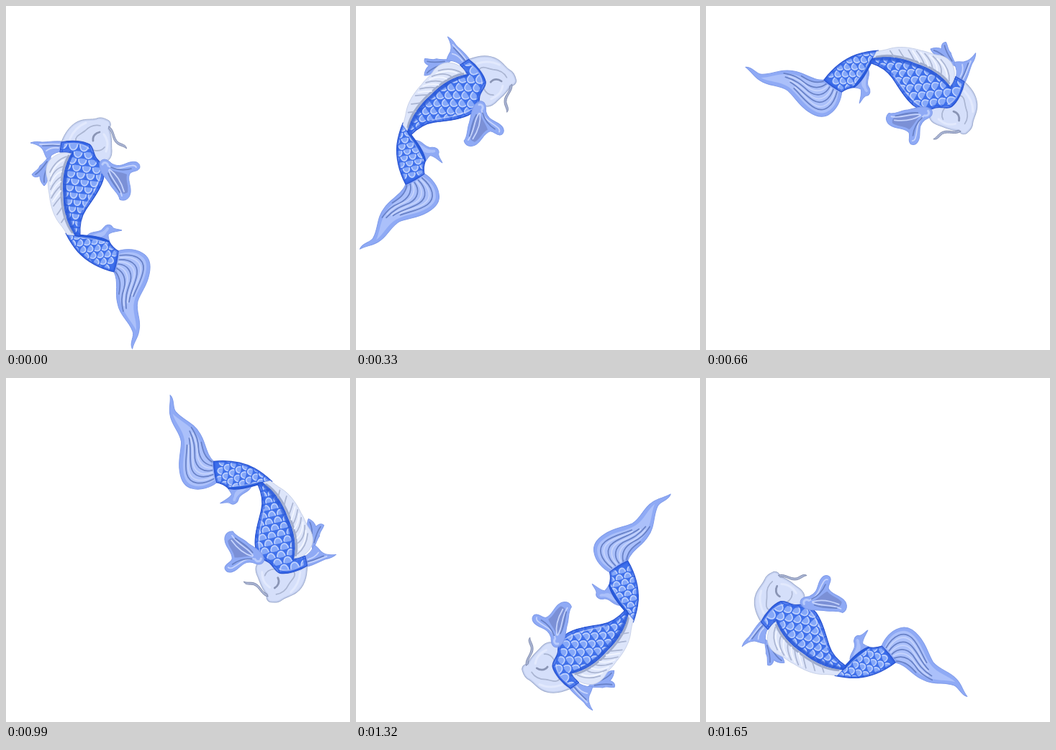
An HTML page for the animation above (1980 ms loop, 478 px wide and 480 px high).

```html
<!DOCTYPE html>
<html lang="en">
<head>
<meta charset="utf-8">
<title>Swimming koi</title>
<style>
  html, body { margin: 0; height: 100%; overflow: hidden; background: #fff; }
  svg { display: block; width: 100%; height: 100%; }
  #koi { fill: none; stroke-linecap: round; stroke-linejoin: round; }
  .fin { fill: #8faaf5; stroke: #7f9bea; }
  .pale { fill: #abc0fa; }
  .shade { fill: #7b90d6; }
  .ray { stroke: #6780c6; stroke-width: 1.7; }
  .light { stroke: #c6d4fc; stroke-width: 1.8; }
  .grey { stroke: #aab5d2; stroke-width: 1.7; }
  .blue { fill: #3f70ea; }
  .scale { fill: #86a8f8; stroke: #3f70ea; stroke-width: 1.6; }
  .glint { stroke: #bdd0fd; stroke-width: 1.7; }
  .rim { stroke: #2f62e6; stroke-width: 8; opacity: .7; }
  .edge { stroke: #2a54d0; stroke-width: 1.2; }
</style>
</head>
<body>
<svg viewBox="0 0 478 480">
  <defs>
    <path id="trunk" d="M77 190C90 187 107 188 116 193C122 197 121 207 126 213C134 221 138 231 135 242C131 257 120 270 111 284C103 296 102 308 103 321L94 320C84 302 79 283 79 262C78 238 82 220 90 206C85 203 79 204 75 204Z"/>
    <path id="stem" d="M83 317C100 321 126 318 143 328C146 334 151 339 156 342C155 352 153 362 150 371C130 366 112 356 100 343C93 335 88 327 83 317Z"/>
    <path id="skull" d="M77 190C82 176 91 164 103 160C112 157 119 159 126 157C133 154 139 158 143 160C147 164 145 169 143 171C148 182 146 193 147 202C147 211 144 216 135 219C126 219 123 211 121 203C118 190 101 187 77 190Z"/>
    <clipPath id="inTrunk"><use href="#trunk"/></clipPath>
    <clipPath id="inStem"><use href="#stem"/></clipPath>
    <clipPath id="inSkull"><use href="#skull"/></clipPath>
  </defs>
  <g id="koi">
    <!-- far fins -->
    <path class="fin" d="M62 208C56 213 53 219 47 223C45 229 40 230 36 235C38 240 44 239 47 237C47 244 50 248 53 251C58 247 58 239 61 231Z"/>
    <path class="ray" d="M57 217C51 226 47 231 41 235M58 223C54 232 52 238 53 246"/>
    <path class="fin" d="M78 189C66 188 58 190 50 190C44 189 39 189 34 191C43 193 49 196 52 202C54 207 55 211 58 214C64 206 70 204 77 203Z"/>
    <path class="light" d="M74 193C64 192 56 193 47 193M73 198C65 197 60 199 56 202"/>
    <path class="ray" d="M75 195C64 194 57 195 51 195"/>

    <!-- lower fin -->
    <path class="fin" d="M111 322C118 312 130 318 135 310C138 305 144 304 147 307C149 312 156 311 161 313C153 315 146 315 142 319C142 323 143 326 144 329Z"/>
    <path class="pale" d="M119 320C128 316 135 317 140 309C144 308 144 312 140 315C138 319 136 321 132 322Z"/>

    <!-- tail -->
    <path class="fin" d="M155 342C167 338 181 339 190 345C199 350 202 360 199 374C196 390 187 400 183 412C180 426 188 438 185 452C184 462 178 468 175.5 478.5C171 470 179 461 176 454C171 440 158 432 155 415C151 400 157 385 150 371Z"/>
    <path class="pale" d="M157 346C170 342 181 343 188 349C196 354 197 364 193 377C189 390 181 400 178 413C175 426 182 440 181 453C176 442 164 430 160 416C156 402 161 386 154 369Z"/>
    <path class="ray" d="M158 348C178 345 192 352 191 367C190 380 182 392 177 405M157 354C172 353 184 360 182 374C180 388 173 398 171 413M156 360C168 361 176 370 173 384C169 396 165 405 167 422M154 366C164 372 167 382 164 394C160 405 160 413 163 426M152 371C160 380 159 391 157 402"/>
    <path class="light" d="M159 351C175 349 189 355 187 370C185 383 178 392 175 404M157 357C170 357 180 364 178 377C175 390 169 400 169 414M155 363C166 366 171 376 168 388C164 398 163 406 164 418"/>

    <!-- rear body -->
    <use href="#stem" class="blue"/>
    <g clip-path="url(#inStem)">
      <g id="stemScales"></g>
      <use href="#stem" class="rim" style="stroke-width:5"/>
      <path fill="#275bdc" d="M86 318L140 320L146 331C129 325 112 326 99 322Z"/>
      <path class="light" d="M103 323C118 324 130 326 141 332" opacity=".5"/>
    </g>
    <use href="#stem" class="edge"/>

    <!-- head -->
    <use href="#skull" fill="#d5dffa"/>
    <g clip-path="url(#inSkull)">
      <use href="#skull" stroke="#b4c1e6" stroke-width="4" opacity=".5"/>
      <path class="grey" d="M97 188C96 181 104 179 110 174C116 168 122 165 131 167M121 201C128 203 133 202 137 197"/>
      <path stroke="#e2e9fd" stroke-width="3" d="M89 185C94 174 101 167 111 163M136 179C142 187 142 194 139 203"/>
      <path stroke="#8a95b5" stroke-width="2.8" d="M121 188C120 181 125 177 130 176"/>
    </g>
    <use href="#skull" stroke="#a0adcf"/>
    <path fill="#a9b4d3" stroke="#7b87aa" stroke-width=".8" d="M143 168C151 172 149 184 156 190C161 193 167 193 167.500 199C163 195 157 196 152 190C147 184 149 177 143 172Z"/>

    <!-- front body -->
    <use href="#trunk" class="blue"/>
    <g clip-path="url(#inTrunk)">
      <g id="trunkScales"></g>
      <use href="#trunk" class="rim"/>
      <path stroke="#2858d4" stroke-width="7" opacity=".6" d="M90 206C76 236 78 285 95 318"/>
      <path class="light" opacity=".6" d="M82 193C96 190 108 192 115 199M132 232C129 251 116 268 107 284"/>
    </g>
    <use href="#trunk" class="edge"/>

    <!-- back fin -->
    <path fill="#dde5fa" stroke="#c3cde6" stroke-width=".8" d="M90 206C83 203 72 205 64 212C56 218 54 230 57 239C59 246 58 254 60 262C62 281 67 294 74 303C79 309 82 314 85 319L95 320C84 303 79 285 79 263C77 239 81 222 90 206Z"/>
    <path stroke="#8794ba" stroke-width="3" opacity=".7" d="M87 209C77 225 76 250 77 264C78 286 83 304 92 316"/>
    <path class="grey" d="M84 210Q69 215 61 232M79 224Q67 227 61 244M77 238Q68 243 62 256M76 251Q69 257 63 268M77 265Q71 272 66 279M79 279Q75 286 71 291M83 293Q79 299 77 302"/>
    <path stroke="#f1f5ff" stroke-width="2" d="M80 215Q68 220 62 237M77 231Q67 235 62 249M76 245Q68 250 63 262M76 258Q70 265 65 273"/>

    <!-- near fin -->
    <path class="fin" d="M131 217C136 211 142 215 147 220C158 226 164 220 172 218C180 216 186 218 186 225C184 232 176 229 172 234C168 242 174 250 173 260C172 270 164 273 158 270C157 262 148 256 144 248C139 240 130 232 130 224Z"/>
    <path class="shade" d="M143 228C154 232 162 232 168 235C166 244 171 251 169 260C163 264 158 261 155 254C149 248 145 240 143 228Z"/>
    <path class="light" d="M143 224C155 230 164 224 173 223C177 222 180 223 181 225M143 229C146 242 158 250 161 265M144 228C154 235 160 245 164 259"/>
    <path class="ray" d="M146 225C157 230 167 229 174 227M142 233C146 246 154 253 158 260"/>
    <path stroke="#b9cbfb" stroke-width="3" d="M134 221C136 217 141 218 142 223"/>
  </g>
</svg>
<script>
  const STEP = 330;
  const PIVOT = '-125.7 -289.3';
  // centre x, centre y, heading in degrees
  const poses = [
    [125.7, 289.3, 0], [114.3, 176.7, 48.6], [248.7, 112.3, 112.7],
    [339, 185, 160.2], [335.7, 329.3, 226], [184.3, 364.7, 308.8]
  ];
  const $ = id => document.getElementById(id);

  const scallop = (x, y, r) =>
    `M${x - r} ${y - r}C${x - r} ${y + r * .9} ${x + r} ${y + r * .9} ${x + r} ${y - r}`;

  // Overlapping scales, laid from the tail end towards the head.
  function addScales(id, rows, cols, size, pitch, taper, place) {
    const group = $(id);
    let shapes = '';
    for (let row = rows - 1; row >= 0; row--) {
      const w = size * (1 - taper * row / rows), r = w * .5;
      for (let col = -cols; col <= cols; col++) {
        const x = (col + row % 2 / 2) * w, y = row * pitch;
        shapes += `<path class="scale" d="${scallop(x, y, r)}"/>` +
          `<path class="glint" d="${scallop(x, y - 1, r * .76)}"/>`;
      }
    }
    group.setAttribute('transform', place);
    group.innerHTML = shapes;
  }

  addScales('trunkScales', 13, 4, 15, 9.6, .3, 'translate(108 201) rotate(7)');
  addScales('stemScales', 9, 3, 12, 8.2, 0, 'translate(91 324) rotate(-60)');

  function draw() {
    const [x, y, angle] = poses[Math.floor(performance.now() / STEP) % poses.length];
    $('koi').setAttribute('transform', `translate(${x} ${y}) rotate(${angle}) translate(${PIVOT})`);
    requestAnimationFrame(draw);
  }
  draw();
</script>
</body>
</html>
```
